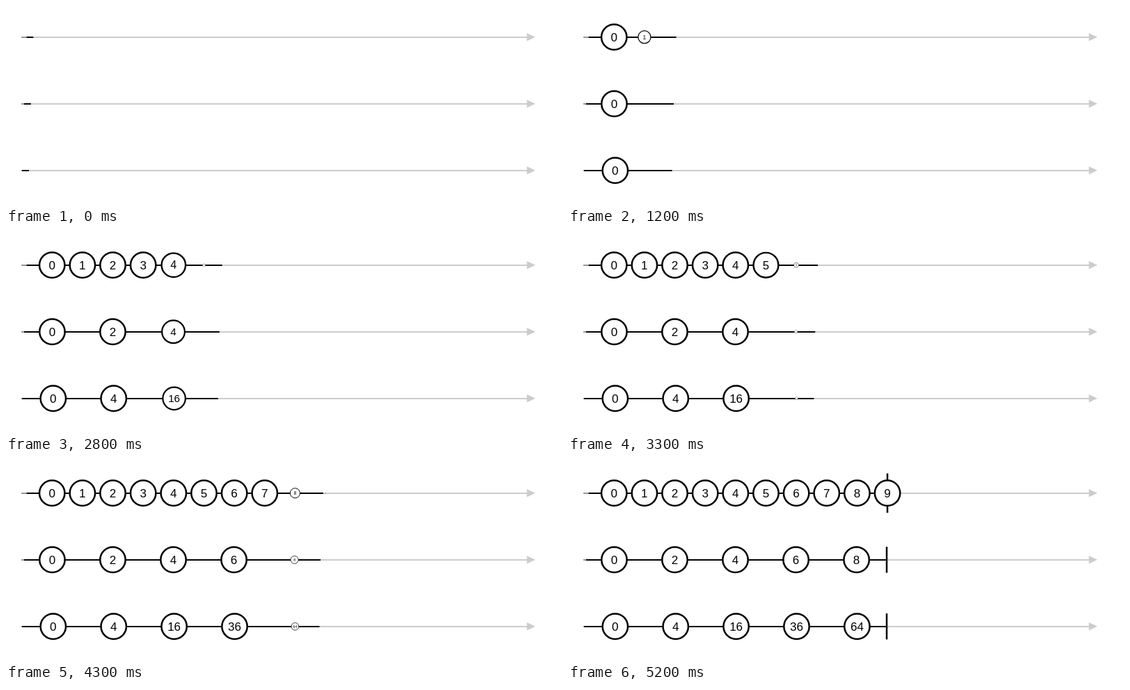
An HTML page with a canvas for the animation above (5.3 s loop, 799x288 px).

```html
<!DOCTYPE html>
<html lang="en">
<head>
<meta charset="utf-8">
<title>Marble diagram</title>
<style>
  html, body { margin: 0; width: 100%; height: 100%; overflow: hidden; background: #fff; }
  canvas { display: block; }
</style>
</head>
<body>
<canvas id="stage" width="799" height="288"></canvas>
<script>
const ctx = document.getElementById("stage").getContext("2d");
const LOOP = 5300, TICK = 100;  // ms
const PERIOD = 450, GROW = 710; // time between values, time a marble takes to pop in
const FIRST = 395;              // when the first marble starts to grow

// start/head: ends of the black trace at time 0; speed in px per ms
const rows = [
  { y: 45,  start: 29.5, head: 39.3, speed: .0969, end: 459, bar: 28.4, delay: 0,
    x: 66.2, gap: 43.65, step: 1, count: 10, value: n => n },
  { y: 141, start: 26,   head: 35.8, speed: .0968, end: 458, bar: 18.7, delay: 40,
    x: 66.4, gap: 87.05, step: 2, count: 5,  value: n => 2 * n },
  { y: 237, start: 23,   head: 33,   speed: .0971, end: 458, bar: 18.7, delay: 46,
    x: 67.8, gap: 86.9,  step: 2, count: 5,  value: n => 4 * n * n },
];

ctx.textAlign = "center";

// Sine ease in and out, from 0 to 1
function grow(age) {
  const p = Math.min(1, Math.max(0, age / GROW));
  return (1 - Math.cos(Math.PI * p)) / 2;
}

function hline(x1, x2, y, color) {
  ctx.fillStyle = color;
  ctx.fillRect(x1, y - 1, x2 - x1, 2);
}

function scaled(x, y, scale, paint) {
  if (scale <= 0) return;
  ctx.save();
  ctx.translate(x, y);
  ctx.scale(scale, scale);
  paint();
  ctx.restore();
}

function axis(y, start) {
  hline(22, 750, y, "#ccc");
  hline(22, start, y, "#999");
  ctx.fillStyle = "#ccc";
  ctx.beginPath();
  ctx.moveTo(748.5, y - 6);
  ctx.lineTo(760.7, y - .2);
  ctx.lineTo(748.5, y + 5.6);
  ctx.fill();
}

function marble(label) {
  ctx.beginPath();
  ctx.arc(0, 0, 18.2, 0, 2 * Math.PI);
  ctx.fillStyle = "#fff";
  ctx.fill();
  ctx.lineWidth = 2.5;
  ctx.strokeStyle = "#000";
  ctx.stroke();
  ctx.fillStyle = "#000";
  ctx.font = "17px Arial, 'Liberation Sans', sans-serif";
  ctx.fillText(label, 0, 6);
}

function drawRow(row, t) {
  const mid = row.y - .2;
  axis(row.y, row.start);
  hline(row.start, Math.min(row.end, row.head + row.speed * t), row.y, "#000");
  scaled(row.end, mid, grow(t - 4185 - row.delay), () =>
    ctx.fillRect(-1.25, -row.bar, 2.5, 2 * row.bar));
  for (let n = 0; n < row.count; n++) {
    const age = t - FIRST - row.delay - n * row.step * PERIOD;
    scaled(row.x + n * row.gap, mid, grow(age), () => marble(row.value(n)));
  }
}

function frame() {
  const t = Math.floor(performance.now() % LOOP / TICK) * TICK;
  ctx.fillStyle = "#fff";
  ctx.fillRect(0, 0, 799, 288);
  rows.forEach(row => drawRow(row, t));
  requestAnimationFrame(frame);
}
frame();
</script>
</body>
</html>
```
